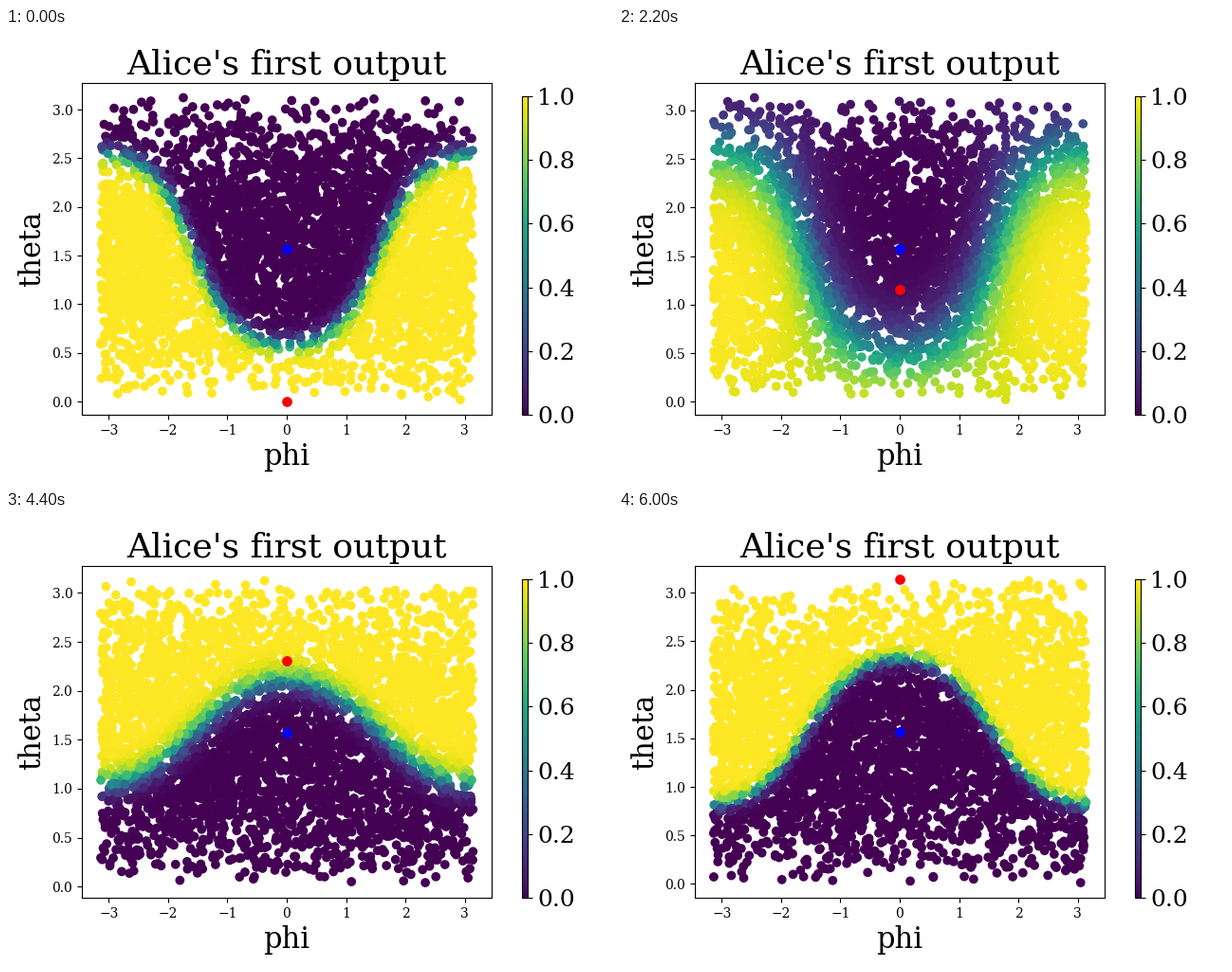
Recreate the animation shown at these times as a matplotlib script. Size 640x480 px, loop 6200 ms.

```python
import numpy as np
import matplotlib.pyplot as plt
from matplotlib.animation import FuncAnimation
from matplotlib.cm import ScalarMappable
from matplotlib.colors import Normalize

STEPS = 31
POINTS = 4000
FLIP = 13  # step at which the dark side swings over

plt.rcParams["font.family"] = "DejaVu Serif"
fig, ax = plt.subplots(figsize=(6.4, 4.8), dpi=100)
fig.subplots_adjust(left=0.125, right=0.8, bottom=0.15, top=0.88)

ax.set_title("Alice's first output", fontsize=26)
ax.set_xlabel("phi", fontsize=22)
ax.set_ylabel("theta", fontsize=22)
ax.set_xlim(-1.1 * np.pi, 1.1 * np.pi)

norm = Normalize(0, 1)
cloud = ax.scatter(np.zeros(POINTS), np.zeros(POINTS), c=np.zeros(POINTS),
                   cmap="viridis", norm=norm)
blue = ax.scatter([0], [np.pi / 2], s=45, color="blue", zorder=4)
red = ax.scatter([0], [0], s=45, color="red", zorder=3)

bar = fig.colorbar(ScalarMappable(norm, "viridis"),
                   cax=fig.add_axes([0.85, 0.15, 0.01, 0.7]))
bar.ax.tick_params(labelsize=18)


def sigmoid(x):
    return 1 / (1 + np.exp(-x))


def fade(step, centre):
    """Opacity that dips briefly around one step."""
    return 1 - 0.75 * max(0, 1 - abs(step - centre) / 2)


def sphere_points(step):
    """Uniform random directions as phi, theta."""
    rng = np.random.default_rng(100 + step)
    phi = rng.uniform(-np.pi, np.pi, POINTS)
    return phi, np.arccos(rng.uniform(-1, 1, POINTS))


def output(phi, theta, step):
    """Soft hemisphere: drifts steadily, flips once, blurs near the flip."""
    centre = 2.16 + 0.028 * step - 2.25 * sigmoid((step - FLIP) / 1.3)
    steepness = 2.8 + 1.4 * abs(step - FLIP)
    dot = (np.cos(centre) * np.cos(theta)
           + np.sin(centre) * np.sin(theta) * np.cos(phi))
    return sigmoid(-steepness * dot)


def update(step):
    phi, theta = sphere_points(step)
    cloud.set_offsets(np.column_stack([phi, theta]))
    cloud.set_array(output(phi, theta, step))

    red.set_offsets([[0, np.pi * step / (STEPS - 1)]])
    red.set_alpha(fade(step, FLIP + 1))
    blue.set_alpha(fade(step, FLIP + 5))

    low, high = theta.min(), theta.max()
    pad = 0.05 * (high - low)
    ax.set_ylim(low - pad, high + pad)
    return cloud, blue, red


anim = FuncAnimation(fig, update, frames=STEPS, interval=200,
                     repeat=True, repeat_delay=0, blit=False)
plt.show()
```
